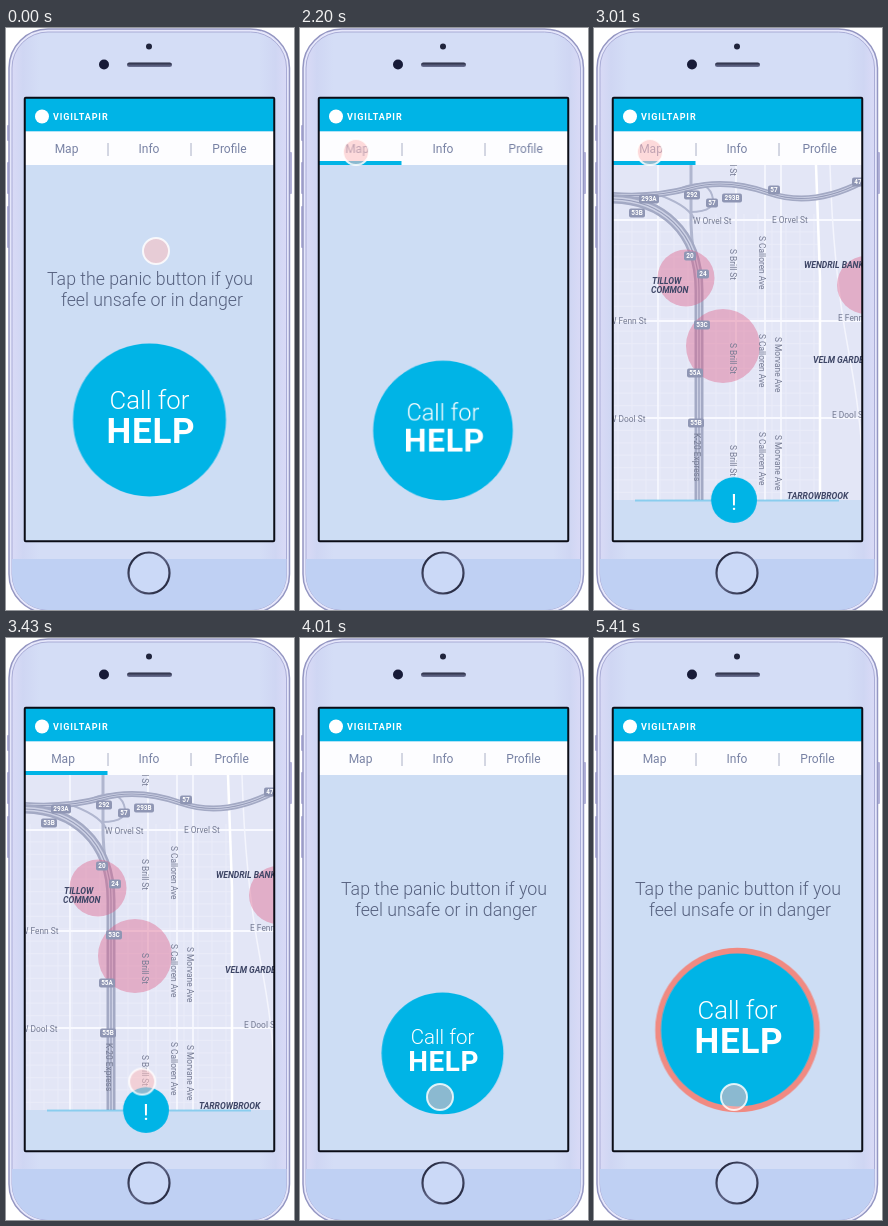
Write an HTML page that moves like this. It is 288 by 582 pixels and loops after 5.98 s.

```html
<!DOCTYPE html>
<html lang="en">
<head>
<meta charset="utf-8">
<title>Panic button app</title>
<style>
  html, body { margin: 0; width: 100%; height: 100%; overflow: hidden; background: #fff; }
  svg { display: block; width: 100%; height: 100%; font-family: Roboto, sans-serif; }
  .nav { font-size: 12px; fill: #7882a4; text-anchor: middle; }
  .prompt { font-size: 17.75px; font-weight: 300; fill: #56617f; }
  .street { font-size: 8.4px; fill: #747a92; }
  .area { font-size: 8.6px; font-weight: 700; font-style: italic; fill: #3d4565; }
  .shield { font-size: 6.4px; font-weight: 700; fill: #fff; text-anchor: middle; }
  .call { fill: #fff; text-anchor: middle; }
</style>
</head>
<body>
<svg viewBox="0 0 288 582" preserveAspectRatio="none">
  <defs>
    <linearGradient id="shell">
      <stop offset="0" stop-color="#d9daf6"/>
      <stop offset=".04" stop-color="#cfd6f3"/>
      <stop offset=".1" stop-color="#d4ddf6"/>
      <stop offset=".9" stop-color="#d4ddf6"/>
      <stop offset=".96" stop-color="#cfd6f3"/>
      <stop offset="1" stop-color="#d9daf6"/>
    </linearGradient>
    <linearGradient id="metal" x2="1" y2="1">
      <stop offset="0" stop-color="#14172a"/>
      <stop offset=".5" stop-color="#5d6385"/>
      <stop offset="1" stop-color="#14172a"/>
    </linearGradient>
    <linearGradient id="slot" x2="0" y2="1">
      <stop offset="0" stop-color="#23263c"/>
      <stop offset="1" stop-color="#70769a"/>
    </linearGradient>
    <clipPath id="shellClip"><rect x="6" y="4" width="274.500" height="578" rx="36"/></clipPath>
    <clipPath id="screenClip"><rect x="19" y="70" width="249" height="443"/></clipPath>
    <clipPath id="mapClip"><rect x="19" y="137" width="249" height="335"/></clipPath>
  </defs>

  <g fill="#b4b3da">
    <rect x="1" y="97" width="2.500" height="16" rx="1"/>
    <rect x="1" y="134" width="2.500" height="32" rx="1"/>
    <rect x="1" y="178" width="2.500" height="42" rx="1"/>
    <rect x="283" y="124" width="3" height="42" rx="1"/>
  </g>
  <rect x="3" y="1" width="280.500" height="584" rx="39" fill="#e6e7fb" stroke="#9496c2" stroke-width="1.500"/>
  <rect x="6" y="4" width="274.500" height="578" rx="36" fill="url(#shell)" stroke="#a9acd6"/>
  <rect x="6" y="531" width="275" height="51" fill="#bfd0f3" clip-path="url(#shellClip)"/>
  <circle cx="143" cy="18.500" r="3" fill="#20243c"/>
  <circle cx="98" cy="36.500" r="5" fill="#171b38"/>
  <rect x="121" y="34.500" width="45" height="4.500" rx="2.250" fill="url(#slot)"/>
  <circle cx="143" cy="545" r="20.500" fill="#cbd9f7" stroke="url(#metal)" stroke-width="2.200"/>

  <rect x="19" y="70" width="249" height="443" fill="#cdddf4"/>
  <g clip-path="url(#screenClip)">
    <g id="map">
      <g id="streets" clip-path="url(#mapClip)"></g>
    </g>
    <path id="line" d="M-102 0H102" stroke="#45bde8"/>

    <g id="prompt" class="prompt">
      <text x="41" y="257">Tap the panic button if you</text>
      <text x="55" y="278">feel unsafe or in danger</text>
    </g>

    <rect x="19" y="70" width="249" height="33.500" fill="#00b4e6"/>
    <circle cx="36" cy="88.500" r="7" fill="#fff"/>
    <text x="47" y="91.800" font-size="9" font-weight="700" letter-spacing=".9" fill="#fff">VIGILTAPIR</text>
    <rect x="19" y="103.500" width="249" height="33.500" fill="#fdfdff"/>
    <g class="nav">
      <text id="navMap" x="60.500" y="125">Map</text>
      <text x="143" y="125">Info</text>
      <text id="navProfile" x="223.500" y="125">Profile</text>
    </g>
    <path d="M102 115v13M185 115v13" stroke="#aab0c6"/>
    <rect id="underline" x="19" y="133" width="82.500" height="4" fill="#00b4e6"/>

    <circle id="ring" r="79" pathLength="360" fill="none" stroke="#f08a82" stroke-width="6.500"
      stroke-dasharray="360 720" transform="translate(143.500 392) rotate(-90)"/>
    <g id="button">
      <circle r="76.500" fill="#00b4e6"/>
      <g id="label" class="call">
        <text y="-11.500" font-size="25.700" font-weight="300">Call for</text>
        <text x="1.500" y="22.500" font-size="35" font-weight="700" letter-spacing=".7">HELP</text>
      </g>
      <text id="bang" class="call" y="33" font-size="76">!</text>
    </g>
    <g id="pointer">
      <circle r="13" fill="#febebd" fill-opacity=".55" stroke="#fff" stroke-opacity=".82" stroke-width="2"/>
    </g>
  </g>
  <rect x="18.750" y="69.750" width="249.500" height="443.500" rx="1" fill="none" stroke="#0b0d16" stroke-width="2"/>
</svg>
<script>
const LOOP = 5980;
const $ = id => document.getElementById(id);

// Map drawing
const parts = [];
const road = (d, color, width) =>
  parts.push(`<path d="${d}" fill="none" stroke="${color}" stroke-width="${width}"/>`);
const text = (kind, x, y, words, turn = 0) =>
  parts.push(`<text class="${kind}" transform="translate(${x} ${y}) rotate(${turn})">${words}</text>`);
const down = (x, words, ...tops) => tops.forEach(y => text('street', x, y, words, 90));
const shield = (x, y, words) => {
  const w = words.length * 4 + 4;
  parts.push(`<rect x="${x - w / 2}" y="${y - 4.5}" width="${w}" height="9" rx="2" fill="#8f96b4"/>`);
  text('shield', x, y + 2.3, words);
};
const zone = (x, y, r) =>
  parts.push(`<circle cx="${x}" cy="${y}" r="${r}" fill="#de6088" fill-opacity=".42"/>`);

parts.push('<rect x="19" y="137" width="249" height="335" fill="#e3e6f6"/>');
for (let x = 24; x < 226; x += 14) road(`M${x} 186V472`, '#eaecf9', 1);
for (let y = 204; y < 472; y += 12.4) road(`M19 ${y}H226`, '#eaecf9', 1);
for (const x of [64, 142, 171, 187]) road(`M${x} 137V472`, '#f8f9ff', 1.6);
for (const y of [192, 293, 390]) road(`M19 ${y}H268`, '#f8f9ff', 1.8);
road('M222 137L226 250V472', '#fff', 2.5);
road('M236 137Q239 240 254 320T268 440', '#f4f5fd', 1.5);

const express = 'M19 171C66 172 105 202 105 262V472';
const cross = 'M19 167Q60 170 96 160T175 165T268 154';
road('M97 137V196Q98 225 104 245', '#b0b6cf', 3);
road('M62 166Q92 176 100 190', '#b0b6cf', 2);
road('M88 160Q112 150 118 167T96 184', '#b0b6cf', 2);
for (const [d, width] of [[cross, 6], [express, 9]]) {
  road(d, '#a3a9c4', width);
  road(d, '#cdd1e5', width * .45);
  road(d, '#969cb9', 1.2);
}

zone(92, 250, 28.5);
zone(129, 318, 37);
zone(272, 257, 29);

shield(55, 171, '293A');
shield(98, 167, '292');
shield(138, 170, '293B');
shield(118, 175, '57');
shield(180, 162, '57');
shield(43, 185, '53B');
shield(264, 154, '47');
shield(96, 228, '20');
shield(109, 246, '24');
shield(108, 297, '53C');
shield(101, 345, '55A');
shield(102, 395, '55B');

text('street', 99, 196, 'W Orvel St');
text('street', 178, 195, 'E Orvel St');
text('street', 15, 296, 'W Fenn St');
text('street', 244, 293, 'E Fenn St');
text('street', 15, 394, 'W Dool St');
text('street', 238, 390, 'E Dool St');
down(136, 'S Brill St', 117, 221, 315, 417);
down(165, 'S Calloren Ave', 208, 306, 404);
down(181, 'S Morvane Ave', 309, 407);
down(100, 'K-20 Express', 405);
text('area', 58, 256, 'TILLOW');
text('area', 57, 265, 'COMMON');
text('area', 210, 240, 'WENDRIL BANKS');
text('area', 219, 335, 'VELM GARDENS');
text('area', 193, 471, 'TARROWBROOK');
$('streets').innerHTML = parts.join('');

// Each step is [time, value, easing towards the next step]
const play = (id, prop, steps) => {
  const last = steps[steps.length - 1][1];
  const frames = [[0, steps[0][1]], ...steps, [LOOP, last]].map(
    ([time, value, easing = 'linear']) => ({ offset: time / LOOP, [prop]: value, easing }));
  $(id).animate(frames, { duration: LOOP, iterations: Infinity });
};
const at = (x, y, scale = 1) => `translate(${x}px, ${y}px) scale(${scale})`;
const fade = (id, ...steps) => play(id, 'opacity', steps);

play('pointer', 'transform', [
  [1689, at(150, 223)], [1690, at(131, 204), 'ease-out'], [1930, at(56, 124)],
  [3100, at(56, 124), 'ease-in-out'], [3490, at(140, 459)]
]);

const big = at(143.5, 392, 1), small = at(140, 472, .3);
play('button', 'transform', [
  [2110, big], [2200, at(143, 402.3, .915)], [2470, at(140.6, 460, .38), 'ease-out'], [2600, small],
  [3860, small], [4010, at(142.5, 415.5, .795), 'ease-out'], [4220, big]
]);
fade('label', [2250, 1], [2400, 0], [3870, 0], [3950, 1]);
fade('bang', [2400, 0], [2560, 1], [3850, 1], [3910, 0]);
fade('prompt', [1990, 1], [2160, 0], [3760, 0], [3830, .3], [3960, 1]);
fade('map', [2320, 0], [2700, 1], [3780, 1], [3830, .9], [3980, 0]);

const lineAt = grow => `translate(143px, 472.5px) scale(${grow}, 1)`;
play('line', 'transform', [
  [2560, lineAt(0), 'ease-out'], [2820, lineAt(1)], [3640, lineAt(1)], [3800, lineAt(0)]
]);
fade('underline', [1970, 0], [2090, 1], [3540, 1], [3680, 0]);
for (const [id, shift] of [['navMap', -3.5], ['navProfile', 2.2]])
  play(id, 'transform', [[1970, at(0, 0)], [2090, at(shift, 0)], [3540, at(shift, 0)], [3680, at(0, 0)]]);

// The ring fills clockwise in distinct jumps
play('ring', 'strokeDashoffset', [
  [0, 360], [4540, 338], [4700, 285], [4765, 230], [4830, 180],
  [5060, 79], [5210, 58], [5275, 38], [5340, 18], [5410, 0]
].map(([time, left]) => [time, left, 'step-end']));
fade('ring', [0, 0, 'step-end'], [4540, 1]);
</script>
</body>
</html>
```
